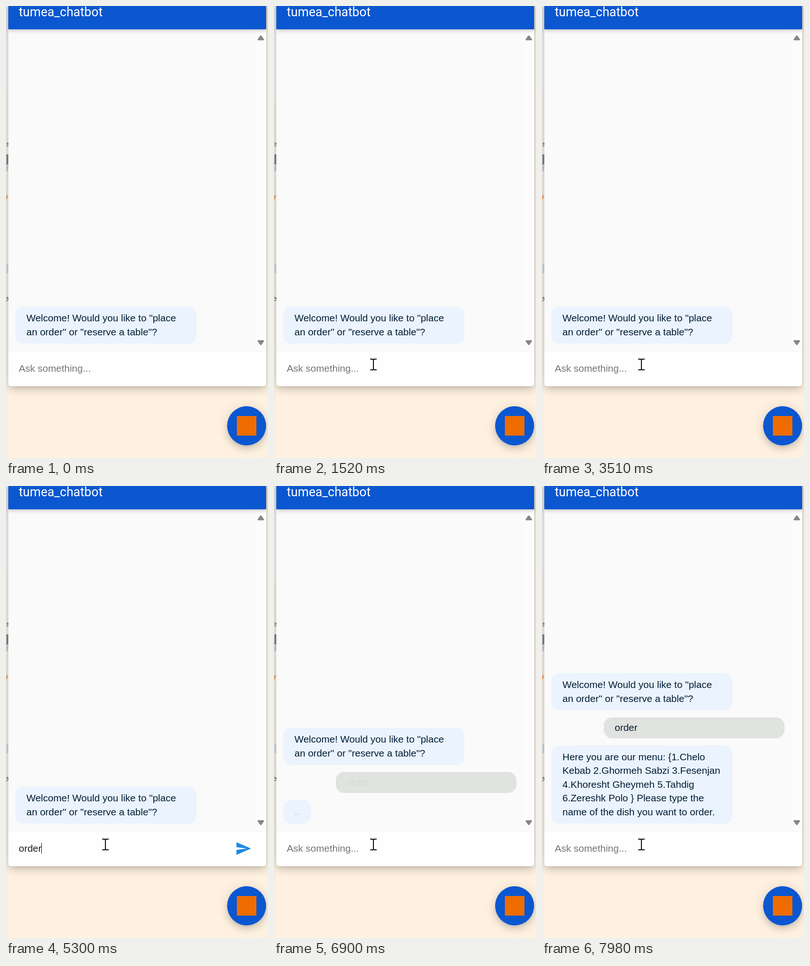
An HTML page for the animation above (8000 ms loop, 564 px wide and 969 px high).

```html
<!DOCTYPE html>
<html lang="en">
<head>
<meta charset="utf-8">
<title>Restaurant chatbot</title>
<style>
html, body { margin: 0; width: 100%; height: 100%; overflow: hidden; }
body { position: relative; background: #fef1e0; font: 21px/29.4px "Liberation Sans", Arial, sans-serif; color: #001d35; }
body * { position: absolute; white-space: nowrap; }
svg { left: 0; top: 0; width: 564px; height: 969px; }
#strip { left: 0; top: 0; width: 5px; height: 969px; overflow: hidden;
  background: linear-gradient(#f4f5f8 170px, #fef1e0 210px); border-left: 1px solid #e3e4e6; box-sizing: border-box; }
#strip b { font: 15px/15px "Liberation Sans", Arial, sans-serif; left: -3px; }
#panel, #fab { box-shadow: 0 4px 8px -2px #00000014, 0 9px 15px #0000001a, 0 2px 27px #0000001f; }
#panel { left: 5px; top: -40px; width: 555px; height: 855px; border-radius: 6px; background: #fafafa; }
#track { left: 537px; top: 50px; width: 23px; height: 689px; background: #fcfcfc; }
#head { left: 5px; top: 0; width: 555px; height: 50px; background: #0b57d0; box-shadow: 0 3px 8px #0003; }
#head span { left: 22.5px; top: -3px; font: 27px/32px Roboto, sans-serif; color: #fff; }
#entry { left: 5px; top: 739px; width: 555px; height: 75px; background: #fefefe; border-top: 1px solid #eee; border-radius: 0 0 6px 6px; }
#typed { left: 27.5px; top: 762px; }
#caret { top: 765px; width: 1px; height: 23px; background: #000; }
#chat { left: 20px; top: 50px; width: 502px; height: 674px; display: flex; flex-direction: column; justify-content: flex-end; gap: 15px; }
.bubble { position: relative; flex: none; width: 390px; border-radius: 18px; background: #ebf3fe; }
.bubble span { left: 24px; top: 10px; }
.bubble br { position: static; }
#hello { height: 79.8px; }
#user { align-self: flex-end; width: 389px; height: 45px; background: #e1e3e0; }
#user span { left: 23.5px; top: 7px; }
#wait { width: 60px; height: 51px; }
#wait span { opacity: .2; }
#reply { height: 168px; }
#fab { left: 476px; top: 858px; width: 84px; height: 84px; border-radius: 50%; background: #0b57d0; }
#fab i { left: 21px; top: 21px; width: 42px; height: 42px; background: #ef6c00; }
</style>
</head>
<body>
<div id="strip">
  <b style="top:233px;color:#8d8a98">:</b>
  <b style="top:288px;color:#3a3a40">e</b>
  <i style="top:318px;width:5px;height:22px;background:#858689"></i>
  <i style="top:341px;left:-8px;width:14px;height:14px;border-radius:50%;background:#c9ccd3"></i>
  <b style="top:401px;left:-1px;color:#f06a0a">r</b>
  <i style="top:553px;width:5px;height:20px;background:#d3d9e4"></i>
  <b style="top:619px;color:#222">e</b>
</div>
<div id="panel"></div>
<div id="track"></div>
<div id="head"><span>tumea_chatbot</span></div>

<div id="chat">
  <div class="bubble" id="hello"><span>Welcome! Would you like to "place<br>an order" or "reserve a table"?</span></div>
  <div class="bubble" id="user"><span>order</span></div>
  <div class="bubble" id="wait"><span></span></div>
  <div class="bubble" id="reply"><span>Here you are our menu: {1.Chelo<br>Kebab 2.Ghormeh Sabzi 3.Fesenjan<br>4.Khoresht Gheymeh 5.Tahdig<br>6.Zereshk Polo } Please type the<br>name of the dish you want to order.</span></div>
</div>

<div id="entry"></div>
<div id="typed"></div>
<div id="caret"></div>
<div id="fab"><i></i></div>

<svg viewBox="0 0 564 969">
  <g fill="#858589" stroke="#858589" stroke-width="3" stroke-linejoin="round">
    <path d="M548.5 64.5L554 72H543z"/>
    <path d="M548.5 725.5L554 718H543z"/>
  </g>
  <path id="send" fill="#1e88e5" transform="translate(493 759.2) scale(1.5)" d="M2.01 21L23 12 2.01 3 2 10l15 2-15 2z"/>
  <circle id="halo" r="18" fill="#ff0" fill-opacity=".47"/>
  <path id="arrow" fill="#fff" stroke="#000" stroke-width="1.4" d="M.7 1.5V23.5L6 18.6 9.4 26.5 13.2 24.9 9.8 17.2H17z"/>
  <path id="beam" fill="none" stroke="#000" stroke-width="2" d="M0 1H4.5Q7 1 7 3.5V21.5Q7 24 4.5 24H0M14 1H9.5Q7 1 7 3.5V21.5Q7 24 9.5 24H14"/>
</svg>

<script>
const LOOP = 8000, BLINK = 530, FRAME = 1000 / 15;
const ENTER = 260, OVER_INPUT = 860, NUDGE = 1460;
const FOCUS = 2980, SEND = 6300, WAIT = 6500, BUBBLE = 6710, REPLY = 6980;
const clicks = [1070, FOCUS, 3250];
const keys = [4030, 4570, 4840, 5040, 5300];
const word = "order";

const $ = id => document.getElementById(id);
const [hello, user, wait, reply, typed, caret, send, halo, arrow, beam] =
  ["hello", "user", "wait", "reply", "typed", "caret", "send", "halo", "arrow", "beam"].map($);
const pen = document.createElement("canvas").getContext("2d");
pen.font = getComputedStyle(typed).font;

const clamp = x => Math.min(1, Math.max(0, x));
const easeOut = p => 1 - (1 - p) ** 2;
const show = (node, on) => { node.style.visibility = on ? "visible" : "hidden"; };
const keep = (node, on) => { node.style.display = on ? "" : "none"; };
const move = (node, x, y) => node.setAttribute("transform", `translate(${x} ${y})`);

function drawChat(t) {
  keep(user, t >= SEND);
  show(user, t >= BUBBLE);
  user.firstChild.style.opacity = clamp((t - 6895) / 135);
  keep(wait, t >= WAIT && t < REPLY);
  wait.firstChild.textContent = ".".repeat(clamp(t >= WAIT) + Math.floor(Math.max(0, t - WAIT) / 210));
  keep(reply, t >= REPLY);
  reply.style.opacity = easeOut(clamp((t - REPLY) / 320));
}

function drawInput(t) {
  const text = t < SEND ? word.slice(0, keys.filter(k => k <= t).length) : "";
  typed.textContent = text || "Ask something...";
  typed.style.color = text ? "#1f1f1f" : "#757575";
  show(send, text);

  // The caret blinks on from the latest focus or key press.
  const last = [FOCUS, ...keys].findLast(k => k <= t);
  show(caret, last && (t - last) % (2 * BLINK) < BLINK);
  caret.style.left = (text ? Math.floor(27.5 + pen.measureText(text).width) : 28) + "px";
}

function drawPointer(t) {
  const p = easeOut(clamp(Math.floor((t - ENTER) / FRAME) / 5));
  move(arrow, 419 - 194 * p, 945 - 139 * p);
  show(arrow, t >= ENTER && t < OVER_INPUT);

  const shift = t < NUDGE ? 1 : 0;
  move(beam, 207 + shift, 756 + shift);
  show(beam, t >= OVER_INPUT);
  move(halo, 211 + shift, 767 + shift);
  show(halo, clicks.some(c => t >= c && t < c + 200));
}

const start = performance.now();
function tick() {
  const t = (performance.now() - start) % LOOP;
  drawChat(t);
  drawInput(t);
  drawPointer(t);
  requestAnimationFrame(tick);
}
tick();
</script>
</body>
</html>
```
